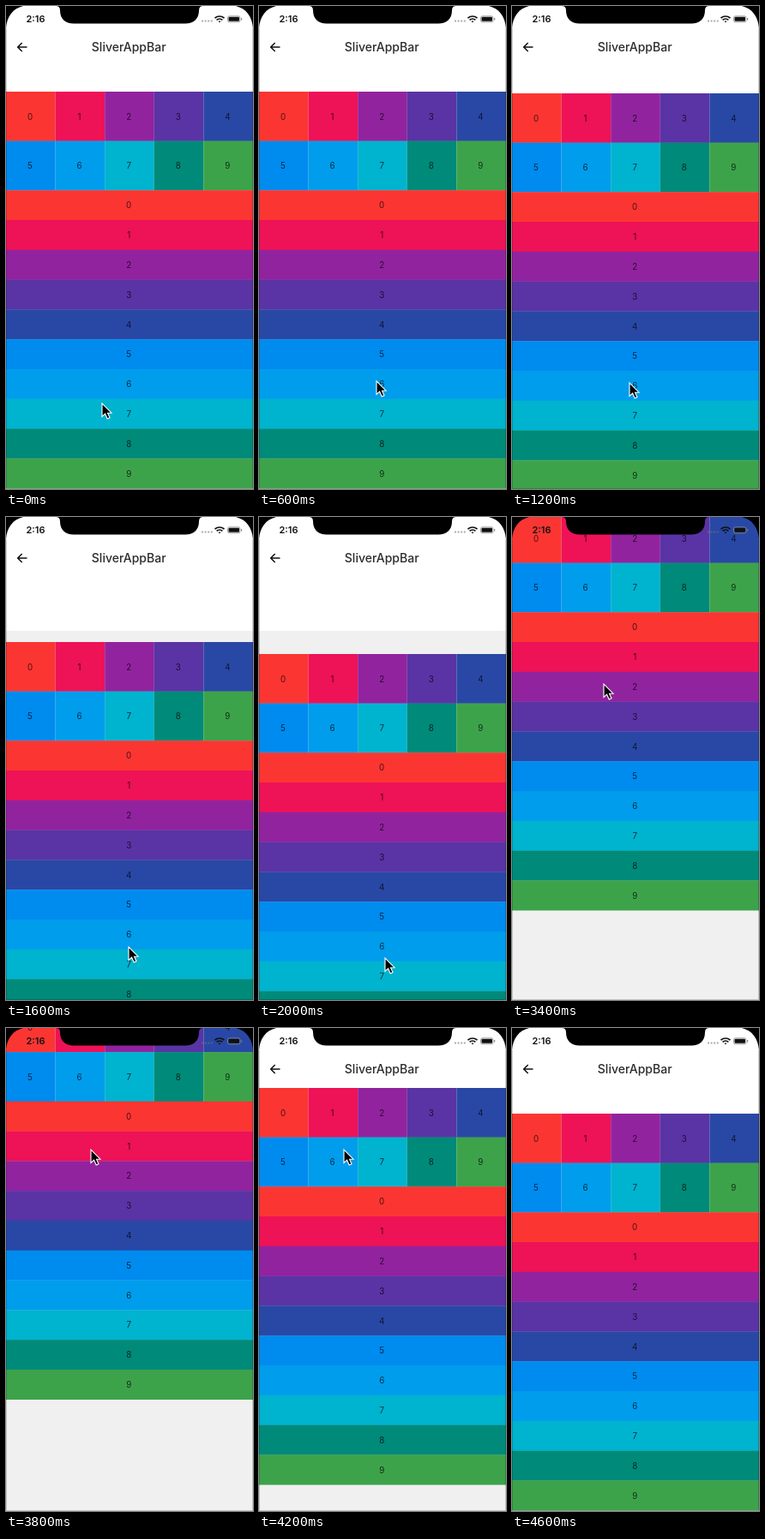
An HTML page for the animation above (4800 ms loop, 288 by 564 pixels).

```html
<!DOCTYPE html>
<html lang="en">
<meta charset="utf-8">
<title>Sliver scroll</title>
<style>
  html, body { margin: 0; width: 100%; height: 100%; overflow: hidden; background: #f0f0f0; }
  svg { display: block; width: 288px; height: 564px; font-family: Inter, sans-serif; }
  .digit { font-size: 9.8px; fill: #000; fill-opacity: .7; text-anchor: middle; }
</style>
<svg viewBox="0 0 288 564">
  <rect width="288" height="564" fill="#f0f0f0"/>
  <g id="content"></g>
  <rect id="bar" width="288" fill="#fff"/>
  <g id="toolbar">
    <path d="M24.5 48H14M18.7 43 13.7 48l5 5" fill="none" stroke="#111" stroke-width="1.5"/>
    <text x="143.2" y="53" font-size="14" font-weight="500" text-anchor="middle" fill="#2b2b2b">SliverAppBar</text>
  </g>
  <text x="23.5" y="19.3" font-size="11" font-weight="600" fill="#111">2:16</text>
  <path d="M228 17.5h13" stroke="#777" stroke-opacity=".6" stroke-width="1.8" stroke-dasharray="2 1.6"/>
  <g fill="none" stroke="#111" stroke-width="1.7">
    <path d="M243.5 14.2a8 8 0 0 1 11 0M245.6 16.4a5 5 0 0 1 6.8 0"/>
    <path d="M247.6 17.6h2.8L249 19.4z" fill="#111" stroke="none"/>
    <rect x="258.5" y="11.8" width="14.5" height="7" rx="2" stroke="#888" stroke-width=".8"/>
    <rect x="259.5" y="12.8" width="12.5" height="5" rx="1" fill="#111" stroke="none"/>
    <path d="M274.7 14v2.6" stroke="#777" stroke-width="1"/>
  </g>
  <path d="M0 0H20C8 3 1 12 0 26ZM288 0H268C280 3 287 12 288 26ZM58 0Q63 0 63 5C63 15 69 20.5 79 20.5H209C219 20.5 225 15 225 5Q225 0 230 0Z"/>
  <path d="M.5 26V563.5H287.5V26" fill="none" stroke="#000" stroke-opacity=".18"/>
  <path id="cursor" d="M0 0V15.5L3.6 12.2 6.2 18 9 16.8 6.5 11.2H11Z" fill="#000" stroke="#fff" stroke-width="1.1"/>
</svg>
<script>
const LOOP = 4800, STEP = 200;
const EXPANDED = 133, COLLAPSED = 69, TOOLBAR = 39;
const CELL = 57.6, ROW = 34.8;
const colors = ['#fb3632', '#ee1257', '#92239f', '#5a34a5', '#2948a5',
                '#008bef', '#009dec', '#00b3cf', '#008a79', '#3da34b'];

// [ms, top edge of the grid]
const scrollKeys = [[0, 100], [1000, 100], [1200, 102], [1400, 120], [1600, 146], [1800, 158],
  [2000, 160], [2200, 159.5], [2400, 142], [2600, 135], [2800, 133], [3000, 133], [3200, 52],
  [3400, -4], [3600, -29.5], [3800, -29.5], [4000, 20], [4200, 70], [4400, 94], [4600, 100]];
// [ms, x, y]
const cursorKeys = [[0, 112, 464], [600, 137, 438], [1200, 137, 440], [1400, 139, 465],
  [1600, 143, 502], [1800, 146, 513], [2000, 147, 515], [2400, 147, 515], [2800, 150, 490],
  [3000, 154, 449], [3200, 136, 320], [3400, 107, 195], [3600, 99, 144], [3800, 99, 142]];
const CURSOR_END = 4600;

const $ = id => document.getElementById(id);
const clamp = (v, lo, hi) => Math.min(hi, Math.max(lo, v));

function valueAt(keys, t) {
  const next = keys.findIndex(k => k[0] > t);
  if (next < 0) return keys.at(-1).slice(1);
  const a = keys[next - 1], b = keys[next];
  const p = (t - a[0]) / (b[0] - a[0]);
  return a.slice(1).map((v, i) => v + (b[i + 1] - v) * p);
}

const tile = (x, y, w, h, i) =>
  `<rect x="${x}" y="${y}" width="${w}" height="${h + .3}" fill="${colors[i]}"/>
   <text class="digit" x="${x + w / 2 - .8}" y="${y + h / 2 + 3.7}">${i}</text>`;

$('content').innerHTML =
  colors.map((_, i) => tile(i % 5 * CELL, Math.floor(i / 5) * CELL, CELL, CELL, i)).join('') +
  colors.map((_, i) => tile(0, 2 * CELL + i * ROW, 288, ROW, i)).join('');

function draw(now) {
  const t = Math.floor(now % LOOP / STEP) * STEP;
  const [top] = valueAt(scrollKeys, t);
  const [x, y] = valueAt(cursorKeys, t);
  $('content').setAttribute('transform', `translate(0 ${top})`);
  $('bar').setAttribute('height', clamp(top, 0, EXPANDED));
  $('toolbar').setAttribute('transform', `translate(0 ${Math.min(0, top - COLLAPSED)})`);
  $('toolbar').setAttribute('opacity', clamp((top - COLLAPSED + TOOLBAR) / TOOLBAR, 0, 1));
  $('cursor').setAttribute('transform', `translate(${x} ${y})`);
  $('cursor').setAttribute('visibility', t < CURSOR_END ? 'visible' : 'hidden');
}

const start = performance.now();
function frame() {
  draw(performance.now() - start);
  requestAnimationFrame(frame);
}
frame();
</script>
</html>
```
